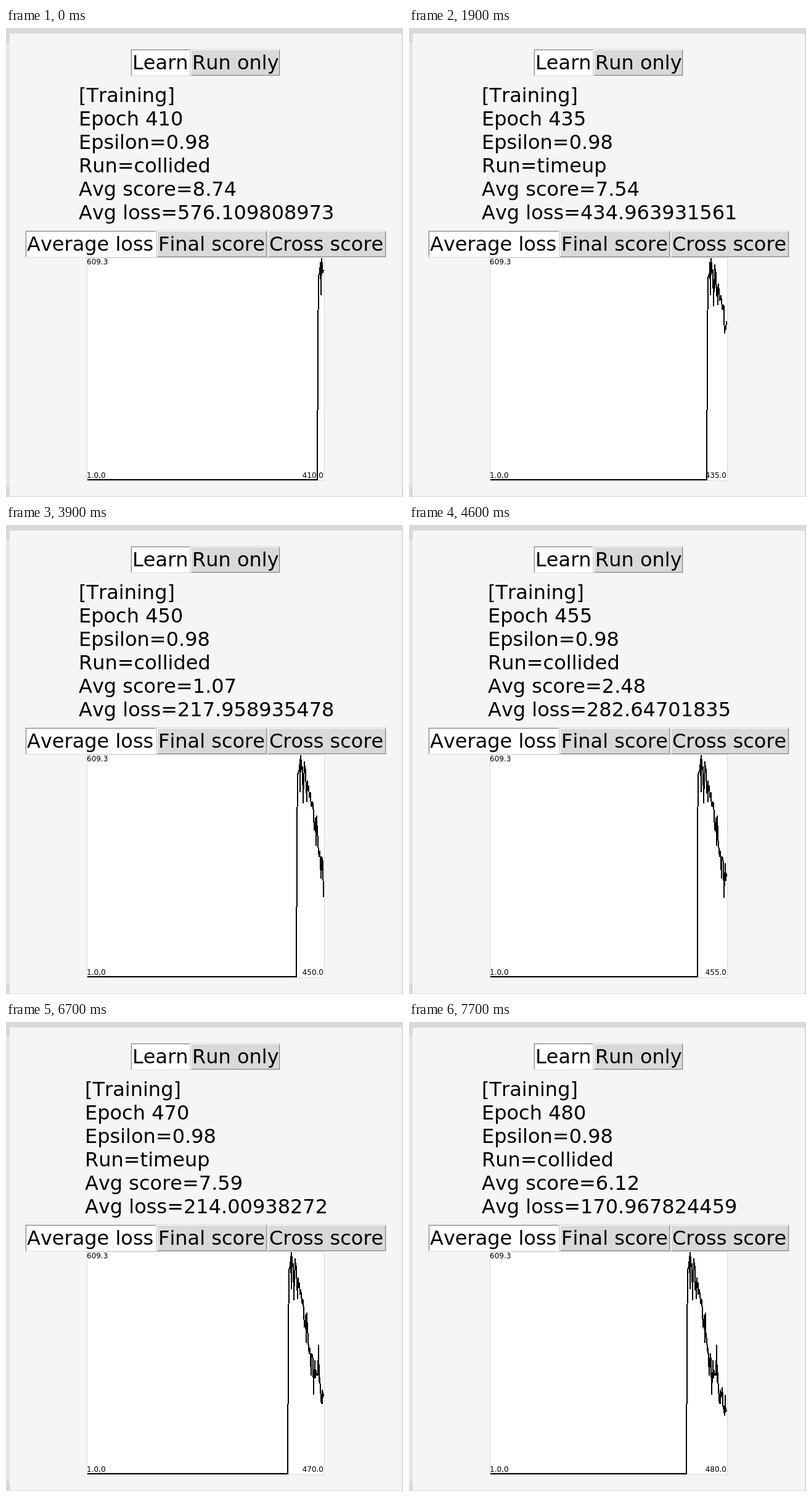
Animation, 644 px wide and 760 px high, one loop 8000 ms. Source, as an HTML page:

```html
<!DOCTYPE html>
<html lang="en">
<head>
<meta charset="utf-8">
<title>Training monitor</title>
<style>
  html, body { margin: 0; width: 100%; height: 100%; overflow: hidden; background: #d9d9d9; }
  body { position: relative; font: 32px/38px "DejaVu Sans", sans-serif; font-kerning: none; color: #000; }
  body > * { position: absolute; white-space: pre; }
  #strip { left: 0; top: 24px; width: 6px; height: 720px; background: #e6e6e6; }
  #panel { left: 6px; top: 9px; width: 636px; height: 750px; background: #f5f5f5; }
  .button {
    box-sizing: border-box; height: 44px; border: 1px solid #d9d9d9; background: #d9d9d9;
  }
  .button span {
    display: block; box-sizing: border-box; height: 42px; padding: 1px;
    border: 1px solid; border-color: #fff #828282 #828282 #fff;
  }
  .button.on span { background: #fff; border-color: #828282 #fff #fff #828282; }
  #status { top: 90px; }
  #plot {
    box-sizing: border-box; left: 131px; top: 372px; width: 386px; height: 362px;
    border: 1px solid #d9d9d9; background: #fff;
  }
  .tick { font-size: 12px; line-height: 14px; }
  #graph { left: 132px; top: 373px; }
</style>
</head>
<body>
<div id="strip"></div>
<div id="panel"></div>
<div id="status"></div>
<div id="plot"></div>
<div class="tick" style="left:131px;top:372px">609.3</div>
<div class="tick" style="left:131px;top:718px">1.0,0</div>
<div class="tick" id="last" style="right:calc(100% - 515px);top:718px"></div>
<svg id="graph" width="384" height="360" viewBox="132 373 384 360">
  <polyline id="curve" fill="none" stroke="#000" stroke-width="2"
    stroke-linejoin="round" shape-rendering="crispEdges"/>
</svg>
<script>
const LOOP = 8000, LEFT = 131, WIDTH = 384, BASE = 732;
const FIRST_LOSS = 400;   // epochs before this one plot as zero

// Plot height of each epoch from FIRST_LOSS on
const heights = [
  512, 405, 402, 398, 396, 380, 432, 372, 388, 396,
  392, 450, 408, 421, 384, 395, 396, 434, 421, 448,
  415, 428, 423, 441, 440, 434, 441, 455, 456, 449,
  451, 470, 494, 486, 488, 475, 519, 472, 500, 507,
  516, 530, 537, 529, 545, 572, 550, 538, 540, 548,
  603, 569, 577, 549, 576, 565, 572, 571, 571, 572,
  524, 583, 569, 582, 590, 613, 618, 597, 618, 600,
  606, 593, 606, 622, 623, 630, 637, 605, 632, 626, 631
];

// start time, run result, average score, average loss
const states = [
  [0, "collided", "8.74", "576.109808973"],
  [400, "collided", "8.02", "570.382716405"],
  [600, "collided", "7.65", "536.518204738"],
  [800, "collided", "7.17", "504.188486828"],
  [1300, "collided", "7.32", "475.604917283"],
  [1900, "timeup", "7.54", "434.963931561"],
  [2900, "timeup", "7.21", "365.582047391"],
  [3600, "collided", "4.36", "269.107482635"],
  [3900, "collided", "1.07", "217.958935478"],
  [4600, "collided", "2.48", "282.64701835"],
  [5000, "collided", "3.15", "352.038174926"],
  [5800, "collided", "4.09", "201.480252093"],
  [6700, "timeup", "7.59", "214.00938272"],
  [7400, "collided", "6.83", "172.63850417"],
  [7700, "collided", "6.12", "170.967824459"]
];

const byId = id => document.getElementById(id);

function addButton(label, left, top, width, on) {
  const button = document.createElement("div");
  button.className = on ? "button on" : "button";
  button.style.cssText = `left:${left}px;top:${top}px;width:${width}px`;
  const face = document.createElement("span");
  face.textContent = label;
  button.append(face);
  document.body.append(button);
}

addButton("Learn", 202, 34, 97, true);
addButton("Run only", 299, 34, 146);
addButton("Average loss", 31, 328, 213, true);
addButton("Final score", 244, 328, 180);
addButton("Cross score", 424, 328, 193);

function curvePoints(epochs) {
  const x = epoch => Math.round(LEFT + (epoch - 1) / (epochs - 1) * WIDTH);
  const points = [[LEFT, BASE], [x(FIRST_LOSS - 1), BASE]];
  for (let epoch = FIRST_LOSS; epoch <= epochs; epoch++) {
    points.push([x(epoch), heights[epoch - FIRST_LOSS]]);
  }
  return points.join(" ");
}

let shown = -1;

function render(time) {
  const index = states.findLastIndex(([start]) => start <= time);
  if (index === shown) return;
  shown = index;
  const [, run, score, loss] = states[index];
  const epoch = 410 + 5 * index;
  const status = byId("status");
  status.textContent = [
    "[Training]", `Epoch ${epoch}`, "Epsilon=0.98",
    `Run=${run}`, `Avg score=${score}`, `Avg loss=${loss}`
  ].join("\n");
  // The block is centred, so one digit less moves it by half a digit
  status.style.left = 118 + 10 * (13 - loss.length) + "px";
  byId("last").textContent = epoch.toFixed(1);
  byId("curve").setAttribute("points", curvePoints(epoch));
}

const begin = performance.now();
function tick() {
  render((performance.now() - begin) % LOOP);
  requestAnimationFrame(tick);
}
tick();
</script>
</body>
</html>
```
